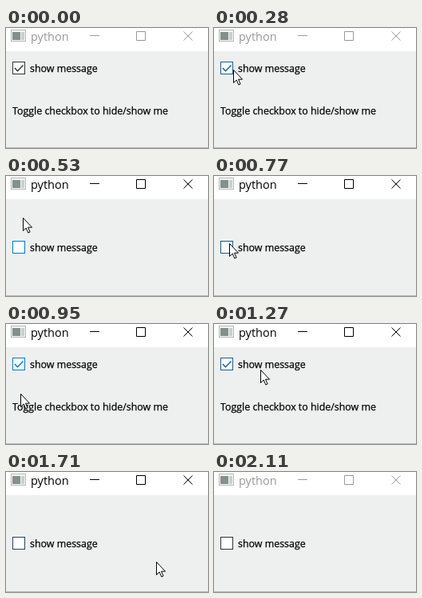
An HTML page for the animation above (2160 ms loop, 253 px wide and 150 px high).

```html
<!DOCTYPE html>
<html lang="en">
<head>
<meta charset="utf-8">
<title>Checkbox demo</title>
<style>
html, body { margin: 0; width: 100%; height: 100%; overflow: hidden; background: #fff; }
svg { display: block; width: 100vw; height: 100vh; }
text { font: 12.42px "Open Sans", "Noto Sans", sans-serif; }
.label { stroke: #000; stroke-width: .25; }
#title { font-size: 14.5px; }
</style>
</head>
<body>
<svg viewBox="0 0 253 150">
  <rect width="253" height="150" fill="#fff"/>
  <rect y="29" width="253" height="120" fill="#eef0f0"/>
  <rect y="149" width="253" height="1" fill="#b9bbbb"/>

  <rect x="6.5" y="2.5" width="18" height="14" fill="#f4f6f6" stroke="#b4b8b8"/>
  <rect x="8" y="5" width="10" height="10" fill="#84908a"/>
  <rect x="19" y="5" width="4" height="10" fill="#c9d0ce"/>

  <g id="bar">
    <text id="title" x="31" y="16">python</text>
    <path d="M105 9.5h12M163.5 4.5h11v11h-11zM222.5 4.5l11 11M233.5 4.5l-11 11" fill="none" stroke="currentColor"/>
  </g>

  <g id="check">
    <rect id="box" x="8.5" y="42.5" width="15" height="15"/>
    <path id="tick" d="M10.8 50l3.7 3.7 7-7.2" fill="none" stroke-width="1.5"/>
    <text class="label" x="30" y="55">show message</text>
  </g>
  <text class="label" id="message" x="8" y="108">Toggle checkbox to hide/show me</text>

  <path id="cursor" d="M.5 .5v16l3.7-3.5 2.6 6 2.3-1-2.6-5.8h5z" fill="#fff" stroke="#000"/>
</svg>
<script>
const LOOP = 2160, ENTER = 100, EXIT = 1860, BLUR = 2110;
const $ = id => document.getElementById(id);
const bar = $("bar"), check = $("check"), box = $("box"), tick = $("tick");
const message = $("message"), cursor = $("cursor");

// Pointer stops: [time, x, y]
const stops = [
  [ENTER, 66, 146], [280, 24, 52], [530, 21, 52], [660, 4, 76], [770, 19, 84],
  [950, 18, 87], [1270, 58, 57], [1480, 60, 55], [1710, 188, 112], [EXIT, 240, 152]
];
// Each visit to the checkbox; releasing the button toggles it
const visits = [
  { over: 220, press: 370, release: 470, out: 550 },
  { over: 720, press: 860, release: 950, out: 1000 },
  { over: 1210, press: 1370, release: 1450, out: 1560 }
];

const clamp = v => Math.min(1, Math.max(0, v));
const lerp = (a, b, u) => a + (b - a) * u;
const show = (el, on) => el.style.visibility = on ? "visible" : "hidden";

function pointer(t) {
  const i = Math.max(1, stops.findIndex(s => s[0] > t));
  const [t0, x0, y0] = stops[i - 1], [t1, x1, y1] = stops[i];
  const u = clamp((t - t0) / (t1 - t0));
  return [lerp(x0, x1, u), lerp(y0, y1, u)].map(Math.round);
}

// The highlight fades in over 100 ms and out over 200 ms
const glow = t => Math.max(...visits.map(v =>
  clamp((t - v.over) / 100) * clamp(1 - (t - v.out) / 200)));

function draw(t) {
  const checked = visits.filter(v => t >= v.release).length % 2 === 0;
  const pressed = visits.some(v => t >= v.press && t < v.release);
  const active = t >= visits[0].press && t < BLUR;
  const h = glow(t);
  const color = pressed ? "#005499"
    : `rgb(${lerp(51, 0, h)},${lerp(51, 120, h)},${lerp(51, 215, h)})`;

  bar.style.color = bar.style.fill = active ? "#000" : "#999";
  check.setAttribute("transform", `translate(0 ${checked ? 0 : 39})`);
  box.setAttribute("fill", pressed ? "#cce4f7" : "#fff");
  box.setAttribute("stroke", color);
  tick.setAttribute("stroke", color);
  show(tick, checked);
  show(message, checked);

  cursor.setAttribute("transform", `translate(${pointer(t)})`);
  show(cursor, t >= ENTER && t < EXIT);
}

const start = performance.now();
function loop(now) {
  draw(Math.max(0, now - start) % LOOP);
  requestAnimationFrame(loop);
}
draw(0);
requestAnimationFrame(loop);
</script>
</body>
</html>
```
